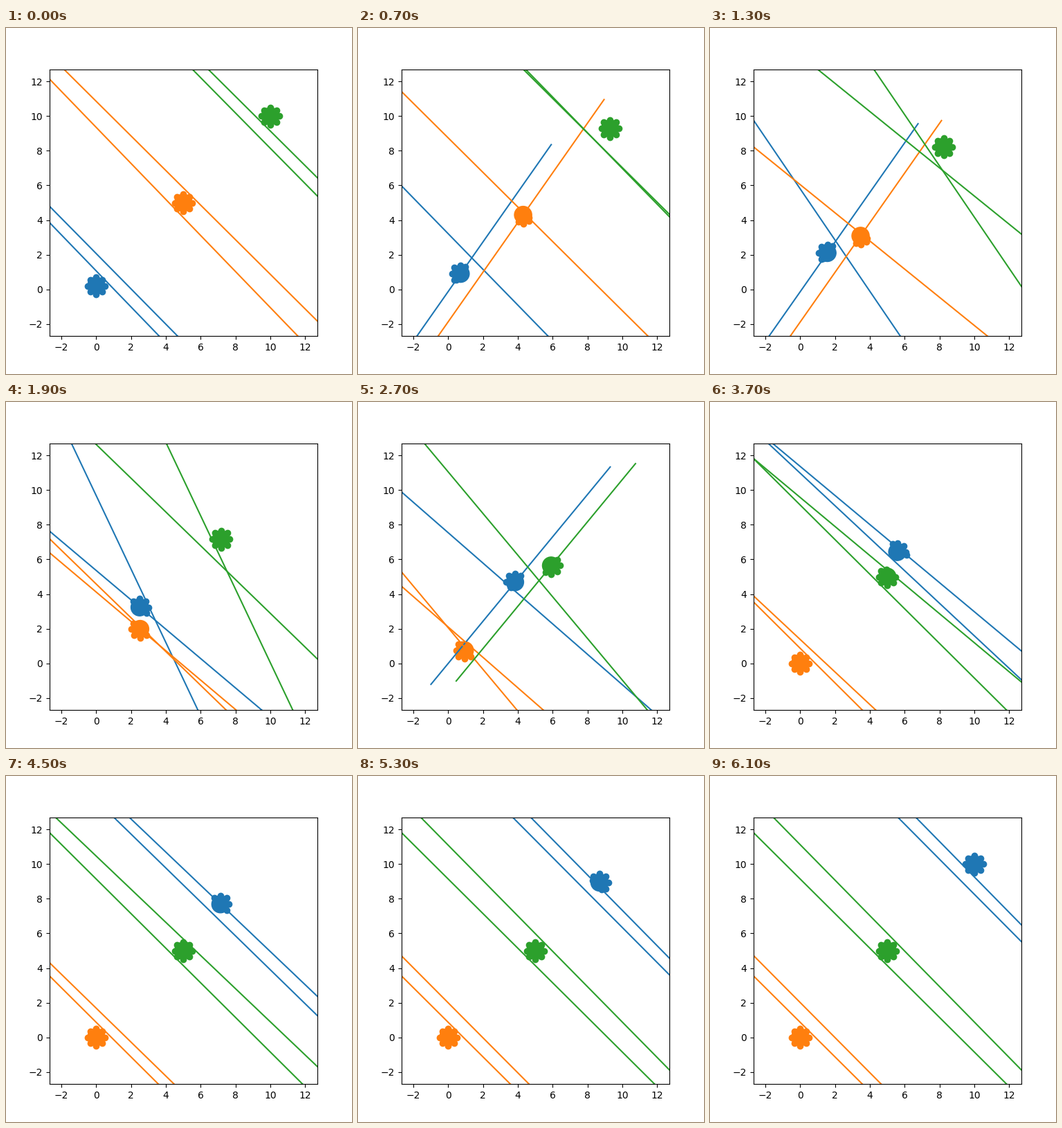
Write a matplotlib script that moves like this. It is 500 px wide and 500 px high and loops after 6.3 s.

```python
from itertools import permutations

import numpy as np
import matplotlib.pyplot as plt
from matplotlib.animation import FuncAnimation
from matplotlib.patches import Circle

# Three discs swap places with optimal reciprocal collision avoidance
RADIUS = 0.5
SPEED = 0.5
HORIZON = 5
STEPS = 30
STARTS = np.array([[0, 0.2], [5, 5], [10, 10]])
GOALS = np.array([[10, 10], [0, 0], [5, 5]])
PAIRS = list(permutations(range(3), 2))

angles = np.arange(8) * np.pi / 4
RING = SPEED * np.column_stack([np.cos(angles), np.sin(angles)])


def half_plane(x, v, own):
    """Point and outward normal of the allowed velocities, and if it is a leg.

    x and v are the relative position and velocity of two robots."""
    size = 2 * RADIUS
    dist = np.hypot(*x)
    tau = HORIZON if dist > size else 1
    near = x / tau * (1 - (size / dist) ** 2)
    leg = dist > size and (v - near) @ near >= 0
    if leg:
        sine = np.copysign(size / dist, v[0] * x[1] - v[1] * x[0])
        cosine = np.sqrt(1 - sine ** 2)
        edge = np.array([[cosine, sine], [-sine, cosine]]) @ x / dist
        normal = np.sign(sine) * np.array([edge[1], -edge[0]])
        u = edge * (v @ edge) - v
    else:
        w = v - x / tau
        normal = w / np.hypot(*w)
        u = normal * size / tau - w
    return own + u / 2, normal, leg


def nearest(want, planes):
    """Allowed velocity closest to the wanted one, for two half planes."""
    (p, n, _), (q, m, _) = planes
    options = [want, want + ((p - want) @ n) * n, want + ((q - want) @ m) * m]
    allowed = [o for o in options
               if (o - p) @ n > -1e-9 and (o - q) @ m > -1e-9]
    if allowed:
        return min(allowed, key=lambda o: np.hypot(*(o - want)))
    return np.linalg.solve([n, m], [p @ n, q @ m])


def simulate():
    pos, vel = STARTS.astype(float), np.zeros((3, 2))
    for _ in range(STEPS):
        planes = {(i, j): half_plane(pos[j] - pos[i], vel[i] - vel[j], vel[i])
                  for i, j in PAIRS}
        yield pos, planes
        way = GOALS - pos
        dist = np.hypot(*way.T)[:, None]
        want = way * SPEED / np.maximum(dist, SPEED)
        vel = np.array([nearest(want[i], facing(planes, i))
                        for i in range(3)])
        pos = pos + vel


def facing(planes, i):
    return [planes[pair] for pair in PAIRS if pair[0] == i]


history = list(simulate())

fig, ax = plt.subplots(figsize=(5, 5), dpi=100)
ax.set_xlim(-2.7, 12.7)
ax.set_ylim(-2.7, 12.7)

discs = [ax.add_patch(Circle((0, 0), RADIUS, color=f"C{i}", lw=1))
         for i in range(3)]
dots = [ax.plot([], [], "o", color=f"C{i}", zorder=1.5)[0] for i in range(3)]
lines = {pair: ax.plot([], [], color=f"C{pair[0]}")[0] for pair in PAIRS}


def draw(frame):
    # The first pose rests for 500 ms, every later one for 200 ms
    step = 0 if frame < 5 else 1 + (frame - 5) // 2
    pos, planes = history[step]

    for pair, (point, normal, leg) in planes.items():
        along = np.array([-normal[1], normal[0]])
        reach = 10.5 * abs(along[1]) if leg else 25
        ends = pos[pair[0]] + point + np.outer([-reach, reach], along)
        lines[pair].set_data(*ends.T)

    for i in range(3):
        discs[i].center = pos[i]
        tips = [nearest(tip, facing(planes, i)) for tip in RING]
        dots[i].set_data(*(pos[i] + tips).T)
    return [*discs, *dots, *lines.values()]


anim = FuncAnimation(fig, draw, frames=63, interval=100, repeat=True,
                     repeat_delay=0, init_func=lambda: draw(0))
plt.show()
```
